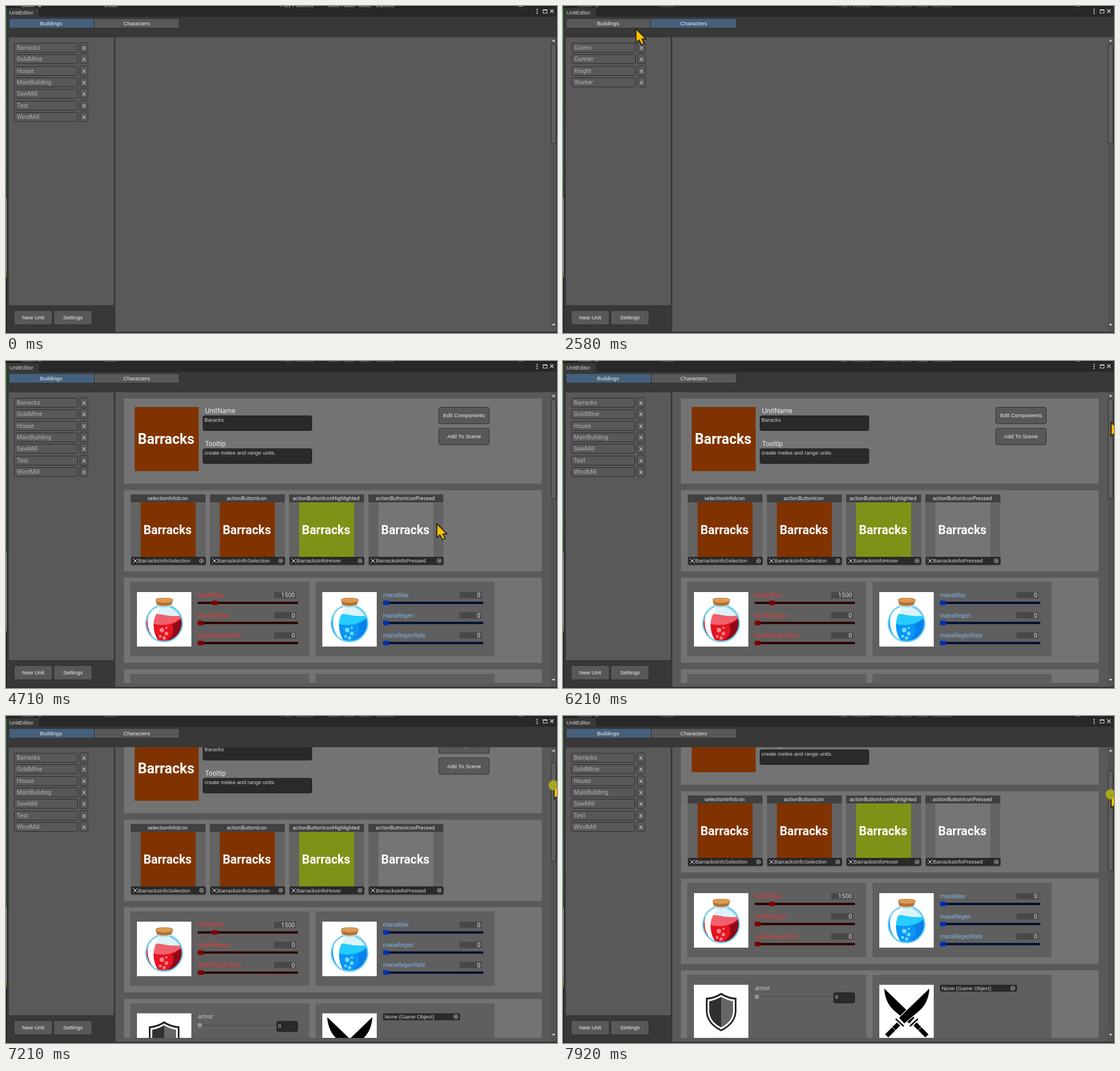
Animation, 972 px wide and 576 px high, one loop 8000 ms. Source, as an HTML page with a canvas:

```html
<!DOCTYPE html>
<html lang="en">
<head>
<meta charset="utf-8">
<title>Unit editor</title>
<style>
  html, body { margin: 0; width: 100%; height: 100%; overflow: hidden; background: #383838; }
  canvas { display: block; }
</style>
</head>
<body>
<canvas id="stage" width="972" height="576"></canvas>
<script>
const ctx = document.getElementById('stage').getContext('2d');
const LOOP = 8000;
const FPS = 24;
const UI = '"Liberation Sans", Arial, sans-serif';
const LABEL = 'Inter, sans-serif';
const SQUARE = 'Roboto, sans-serif';

const POINTER = [ // time, x, y
  [700, 330, -40], [1040, 226, 28], [1200, 223, 26], [1580, 223, 26], [1710, 247, 51],
  [1840, 247, 51], [2250, 168, 50], [2420, 168, 50], [2790, 79, 28], [3250, 79, 28],
  [3560, 79, 76], [4340, 79, 76], [4540, 711, 302], [4670, 711, 302], [4880, 980, 219],
  [5130, 980, 133], [5880, 967, 108]
];
const SCROLL = [[6590, 0], [6917, 26], [7500, 63.5], [7917, 95]];
const PRESSES = [[1080, 1200], [3040, 3250], [4000, 4160], [6000, 6200], [6620, LOOP]];
const BUILDINGS = ['Barracks', 'GoldMIne', 'House', 'MainBuilding', 'SawMill', 'Test', 'WindMill'];
const CHARACTERS = ['Golem', 'Gunner', 'Knight', 'Worker'];

const displayedTime = t => Math.floor((t + 5) * FPS / 1000) * 1000 / FPS;

function sample(keys, t) {
  const i = keys.findIndex(k => k[0] > t);
  if (i < 0) return keys[keys.length - 1].slice(1);
  if (i === 0) return keys[0].slice(1);
  const a = keys[i - 1], b = keys[i], f = (t - a[0]) / (b[0] - a[0]);
  return a.slice(1).map((v, n) => v + (b[n + 1] - v) * f);
}

function rect(x, y, w, h, fill) {
  ctx.fillStyle = fill;
  ctx.fillRect(x, y, w, h);
}

function box(x, y, w, h, fill, border, radius = 2) {
  ctx.beginPath();
  ctx.roundRect(x + .5, y + .5, w - 1, h - 1, radius);
  ctx.fillStyle = fill;
  ctx.fill();
  ctx.strokeStyle = border;
  ctx.lineWidth = 1;
  ctx.stroke();
}

// y is the middle of the capitals
function text(str, x, y, size = 9.6, color = '#e4e4e4', align = 'left', family = UI, weight = 400) {
  ctx.font = `${weight} ${size}px ${family}`;
  ctx.textAlign = align;
  ctx.fillStyle = color;
  ctx.fillText(str, x, y + size * .36);
}

function disc(x, y, r, fill) {
  ctx.beginPath();
  ctx.arc(x, y, r, 0, 7);
  ctx.fillStyle = fill;
  ctx.fill();
}

function shape(d, fill, stroke, width = 1) {
  const path = new Path2D(d);
  if (fill) { ctx.fillStyle = fill; ctx.fill(path); }
  if (stroke) { ctx.strokeStyle = stroke; ctx.lineWidth = width; ctx.stroke(path); }
}

function at(x, y, draw) {
  ctx.save();
  ctx.translate(x, y);
  draw();
  ctx.restore();
}

function button(label, x, y, w, h) {
  box(x, y, w, h, '#585858', '#303030', 3);
  text(label, x + w / 2, y + h / 2, 9.6, '#eee', 'center');
}

function windowFrame(t) {
  rect(0, 0, 972, 576, '#383838');
  rect(0, 0, 972, 19, '#282828');
  rect(0, 0, 972, 3, '#232323');
  ctx.save();
  ctx.beginPath();
  ctx.rect(0, 0, 972, 3);
  ctx.clip();
  const strip = t < 40 ? '#c4c4c4' : '#777';
  [['Scale', 27], ['0.53x', 173], ['Play Focused', 484], ['Mute Audio', 567], ['Stats', 622], ['Gizmos', 652]]
    .forEach(([s, x]) => text(s, x, -1, 9.6, strip));
  rect(57, 0, 5, 1.5, strip);
  rect(904, 0, 8, 1, strip);
  ctx.restore();

  rect(0, 3, 2, 573, '#242424');
  const green = ctx.createLinearGradient(0, 5, 0, 338);
  ['#2c9a10', '#2f8f74', '#299a20', '#2f8f74', '#3a8f68', '#278a10'].forEach((c, i) => green.addColorStop(i / 5, c));
  rect(0, 5, 1, 333, green);
  rect(0, 338, 1, 130, '#c8c8c8');
  rect(0, 468, 1, 10, '#c0a020');

  rect(2, 4, 56, 15, '#383838');
  text('UnitEditor', 6, 11.5, 9.6, '#d4d4d4');
  [5, 8.5, 12].forEach(y => rect(936, y, 2, 2, '#ccc'));
  ctx.strokeStyle = '#ccc';
  ctx.lineWidth = 1;
  ctx.strokeRect(947.5, 6.5, 7, 6);
  rect(947, 6, 8, 2, '#ccc');
  shape('M960 6l6 6m0-6l-6 6', null, '#ccc', 1.5);
}

function tabs(characters, pointer) {
  const hover = pointer[1] > 22 && pointer[1] < 39;
  const split = characters ? 154 : 155;
  const tab = (label, x, w, selected, center) => {
    box(x, 21.5, w, 18, selected ? (hover ? '#4f657f' : '#46607c') : '#585858', '#2c2c2c');
    text(label, center, 30.5, 9.6, '#eee', 'center');
  };
  tab('Buildings', 5, split - 4, !characters, 79.5);
  tab('Characters', split, 306 - split, characters, 230.5);
}

function unitList(characters, pointer) {
  rect(5, 55, 185, 472, '#595959');
  rect(5, 55, 185, 1, '#4c4c4c');
  const left = characters ? 15 : 14;
  (characters ? CHARACTERS : BUILDINGS).forEach((name, i) => {
    const y = Math.round(65 + i * 20.3);
    const hover = !characters && i === 0 && pointer[0] > 14 && pointer[0] < 127 && pointer[1] > 65 && pointer[1] < 82;
    box(left, y, 113, 17, hover ? '#676765' : '#585858', '#2b2b2b');
    text(name, left + 5, y + 8.2, 10.5, hover ? '#fff' : '#b0b0b0', 'left', SQUARE);
    box(left + 116, y - 1, 15, 18, '#585858', '#303030');
    text('X', left + 123.5, y + 8.2, 9.6, '#eee', 'center');
  });
  button('New Unit', 14, 536, 68, 26);
  button('Settings', 84, 536, 68, 26);
}

function scrollbar(scroll) {
  rect(961, 55, 10, 519, '#535353');
  shape('M963 62.5l3-3.5l3 3.5z', '#ddd');
  shape('M963 560l3 3.5l3-3.5z', '#ddd');
  box(961.5, 66.5 + scroll / 3.17, 9, 177, '#606060', '#303030', 4);
}

function objectField(label, inset, x, y, w, h) {
  box(x, y, w, h, '#2a2a2a', '#222');
  const cx = x + w - 7.5, cy = y + h / 2;
  ctx.beginPath();
  ctx.arc(cx, cy, 3.5, 0, 7);
  ctx.strokeStyle = '#c8c8c8';
  ctx.lineWidth = 1;
  ctx.stroke();
  disc(cx, cy, 1.3, '#c8c8c8');
  text(label, x + inset, cy, 9.5, '#d2d2d2');
}

function identityPanel() {
  rect(208, 66, 737, 150, '#737373');
  rect(227, 81, 113, 113, '#803300');
  text('Barracks', 282.5, 137, 25, '#fff', 'center', SQUARE, 700);
  [['UnitName', 88, 'Baracks'], ['Tooltip', 146, 'create melee and range units.']].forEach(([title, y, value]) => {
    text(title, 351, y, 11.5, '#f2f2f2', 'left', LABEL);
    box(347, y + 8, 193, 27, '#2a2a2a', '#1c1c1c', 3);
    text(value, 350, y + 15.5, 9.5, '#d2d2d2');
  });
  button('Edit Components', 763, 81, 90, 30);
  button('Add To Scene', 763, 118, 90, 30);
}

function iconPanel() {
  rect(208, 227.5, 737, 143, '#737373');
  [
    ['selectionInfoIcon', '#803300', 'Selection'], ['actionButtonIcon', '#803300', 'Selection'],
    ['actionButtonIconHighlighted', '#809118', 'Hover'], ['actionButtonIconPressed', '#757575', 'Pressed']
  ].forEach(([title, color, suffix], i) => {
    const x = 220 + i * 139.8;
    rect(x, 235, 132, 126, '#636363');
    rect(x, 235, 132, 14, '#404040');
    text(title, x + 65, 242, 8.8, '#eee', 'center', LABEL);
    rect(x + 17.5, 249, 97, 96, color);
    text('Barracks', x + 65, 297, 21.3, '#fff', 'center', SQUARE, 700);
    objectField('BarracksInfo' + suffix, 12.5, x + .5, 345, 132, 14);
    rect(x + 6.5, 350.5, 3, 3, '#ddd');
    [[4, 348], [10, 348], [4, 354], [10, 354]].forEach(([dx, y]) => rect(x + dx, y, 2, 2, '#8a8ab0'));
  });
}

function potion(x, y, c) {
  at(x, y, () => {
    rect(0, 0, 96, 96, '#fff');
    const body = new Path2D('M36 19L37 25A32 32 0 1 0 59 25L60 19Z');
    ctx.fillStyle = '#dcf3fb';
    ctx.fill(body);
    ctx.save();
    ctx.clip(body);
    shape('M59 20L57 27Q72 34 82 52V30Z', '#9bd9f0');
    shape('M14 45Q28 36 46 40T82 41V90H14Z', c.surface);
    shape('M14 48Q26 58 44 58Q66 58 82 42V92H14Z', c.main);
    shape('M82 41Q74 53 62 57Q70 74 50 88H82Z', c.dark);
    shape('M37 24Q24 30 20 44Q15 66 31 82L37 85Q27 68 30 50Q33 36 42 26Z', '#fff');
    [[44, 67, 4], [52, 73, 3.2], [41, 78, 2.5], [48, 81, 3], [52, 63, 2]].forEach(b => disc(...b, c.bubble));
    ctx.restore();
    ctx.strokeStyle = '#6ccdee';
    ctx.lineWidth = 2.4;
    ctx.stroke(body);
    shape('M34 23Q48 29 62 23', null, '#a8e3f6', 3);
    shape('M33 14Q33 10 48 10T64 14L61 22Q48 27 35 22Z', '#b8712f');
    ctx.beginPath();
    ctx.ellipse(48.5, 14.5, 15, 4.2, 0, 0, 7);
    ctx.fillStyle = '#d99b57';
    ctx.fill();
  });
}

function statCard(x, prefix, first, c) {
  rect(x, 389, 316, 131, '#5f5f5f');
  potion(x + 12, 407, c);
  ['Max', 'Regen', 'RegenRate'].forEach((suffix, i) => {
    const y = 412.5 + i * 35.4, value = i ? 0 : first;
    text(prefix + suffix, x + 119, y, 10.2, c.label, 'left', SQUARE);
    rect(x + 254, y - 5.5, 39, 11, '#484848');
    text(value, x + 291, y, 11, '#e0e0e0', 'right', SQUARE);
    rect(x + 119, y + 11.5, 177, 4, c.bar);
    ctx.beginPath();
    ctx.roundRect(x + 119 + value / 60, y + 9.5, 11, 8, 3);
    ctx.fillStyle = c.knob;
    ctx.fill();
  });
}

function statsPanel() {
  rect(208, 381.5, 737, 150, '#737373');
  statCard(219, 'health', 1500, {
    label: '#e23a3a', bar: '#2c0000', knob: '#800000',
    main: '#e5131f', dark: '#8e0a16', surface: '#f0606c', bubble: '#f58088'
  });
  statCard(546, 'mana', 0, {
    label: '#7fb2e2', bar: '#000f30', knob: '#0030b0',
    main: '#0a95f5', dark: '#0a80ea', surface: '#25ccff', bubble: '#6fd8ff'
  });
}

function shield() {
  rect(0, 0, 96, 96, '#fff');
  shape('M48 14Q60 22 75 23V47Q74 69 48 82Q22 69 21 47V23Q36 22 48 14Z', '#262626');
  shape('M48 18Q60 25 72 26V47Q71 67 48 78.5Q25 67 24 47V26Q36 25 48 18Z', '#fff');
  shape('M48 21Q38 27 27 29V47Q28 65 48 75Z', '#303030');
  shape('M48 21Q58 27 69 29V47Q68 65 48 75Z', '#666');
}

function sword() {
  shape('M8 5Q9 32 27 47L53 69L63 58Z', '#000', '#fff', 1.2);
  shape('M54 73L68 60', null, '#000', 2.5);
  shape('M63 69L84 90', null, '#000', 8);
  shape('M68 81L75 74', null, '#fff', 1);
}

function combatPanel() {
  rect(208, 543, 737, 150, '#737373');
  rect(219, 551, 316, 131, '#5f5f5f');
  rect(546, 551, 316, 131, '#5f5f5f');
  at(231, 568.5, shield);
  text('armor', 339, 574.5, 9.4, '#d0d0d0', 'left', LABEL);
  rect(342, 589, 134, 1, '#4b4b4b');
  disc(342, 589.5, 4, '#929292');
  box(477, 582, 38, 19, '#2a2a2a', '#1c1c1c', 3);
  text('0', 480, 590, 9.6, '#d2d2d2');
  at(558, 568.5, () => {
    rect(0, 0, 96, 96, '#fff');
    sword();
    ctx.translate(97, 0);
    ctx.scale(-1, 1);
    sword();
  });
  objectField('None (Game Object)', 3, 665, 568.5, 136, 12);
}

function inspector(scroll) {
  ctx.save();
  ctx.beginPath();
  ctx.rect(194, 55, 767, 512);
  ctx.clip();
  ctx.translate(0, -scroll);
  identityPanel();
  iconPanel();
  statsPanel();
  combatPanel();
  ctx.restore();
}

function drawPointer([x, y], pressed) {
  at(x, y, () => shape('M0 0V24L5.5 19.5L10 28L14.5 25.8L10.5 18L17.5 17.5Z', '#ffc000', '#111', 1.5));
  if (pressed) disc(x - 1, y, 9, 'rgba(176,176,24,.88)');
}

function draw(t) {
  const characters = t >= 1200 && t < 3160;
  const scroll = sample(SCROLL, t)[0];
  const pointer = sample(POINTER, t);
  pointer[1] += scroll / 3.17;
  windowFrame(t);
  tabs(characters, pointer);
  unitList(characters, pointer);
  rect(193, 55, 779, 519, '#595959');
  rect(971, 19, 1, 557, '#2a2a2a');
  rect(0, 574.5, 972, 1.5, '#2a2a2a');
  if (t >= 4080) inspector(scroll);
  scrollbar(scroll);
  drawPointer(pointer, PRESSES.some(([from, to]) => t >= from && t < to));
}

const begin = performance.now();
function tick() {
  draw(displayedTime((performance.now() - begin) % LOOP));
  requestAnimationFrame(tick);
}
tick();
</script>
</body>
</html>
```
